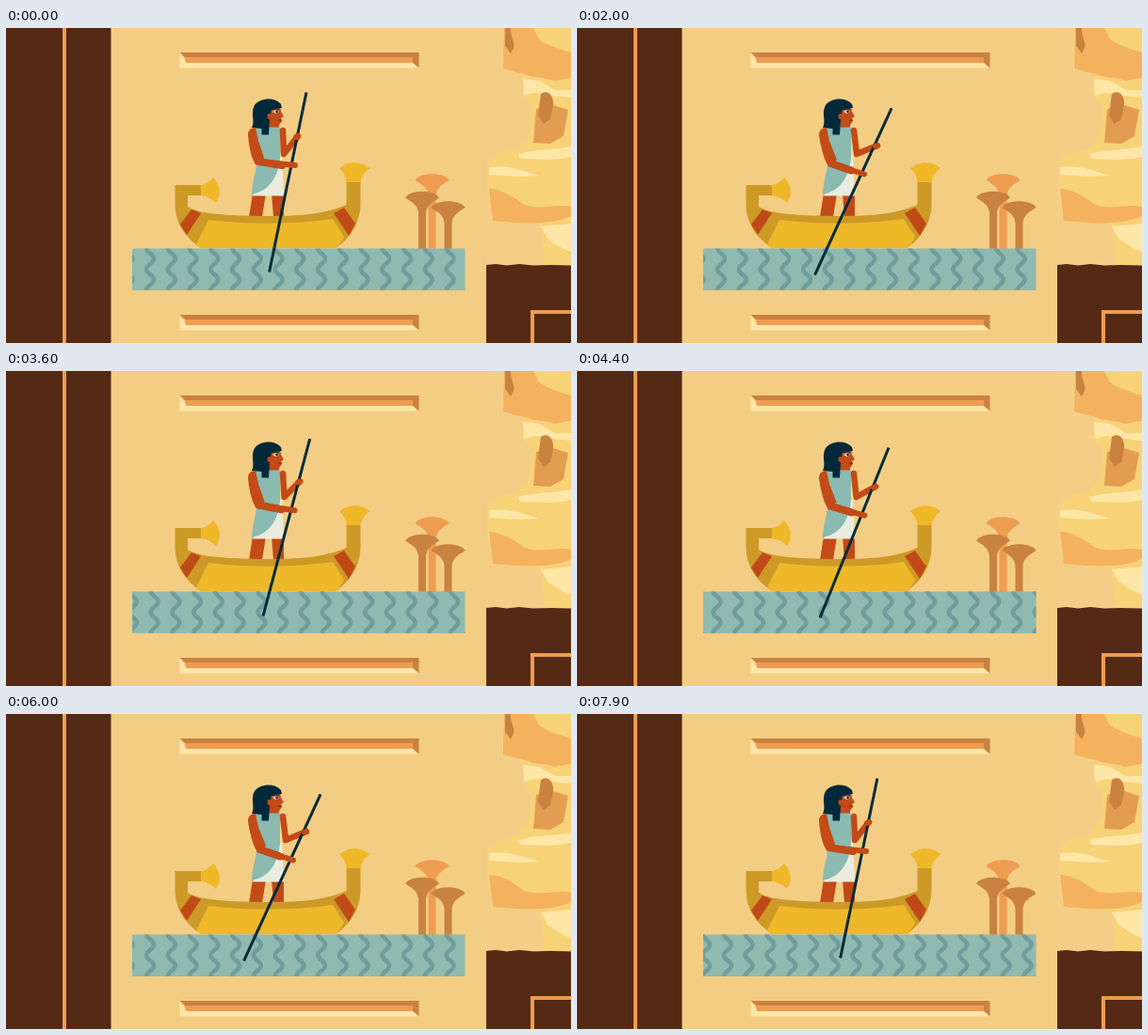
An HTML page that plays this animation: 600x335 px, repeating every 8000 ms.

```html
<!DOCTYPE html>
<html lang="en">
<head>
<meta charset="utf-8">
<title>River boat</title>
<style>
  html, body { margin: 0; width: 100%; height: 100%; overflow: hidden; background: #f4cd84; }
  svg { display: block; width: 600px; height: 335px; }
  .brown { fill: #542a15; }
  .orange { fill: #ee9c50; }
  .tan { fill: #c98240; }
  .cream { fill: #fde6a6; }
  .sand { fill: #f8d277; }
  .clay { fill: #f4b25f; }
  .gold { fill: #efb829; }
  .dark { fill: #cd9a28; }
  .red { fill: #c04a17; }
  .skin { fill: #c24b18; }
  .teal { fill: #8abab0; }
  .navy { fill: #02293a; }
  .limb { fill: none; stroke: #c24b18; stroke-linecap: round; stroke-linejoin: round; }
  #waves path { fill: none; stroke: #709d9b; stroke-width: 4.5; }
</style>
</head>
<body>
<svg viewBox="0 0 600 335">
  <defs>
    <g id="bar">
      <path class="cream" d="M184.500 26V42.500H438.500L431 36H191Z"/>
      <path class="tan" d="M184.500 26H438.500V42.500L432 37V31H190Z"/>
      <path class="orange" d="M190 31H432V37H191Z"/>
    </g>
    <path id="lotus" d="M-18 6C-14 -3 14 -3 18 6C12 10 5 13 4 22V90H-4V22C-5 13 -12 10 -18 6Z"/>
    <clipPath id="pool"><path d="M134 234.500H487.500V279H134Z"/></clipPath>
    <clipPath id="ground"><path d="M420 140H500V235H420Z"/></clipPath>
  </defs>

  <rect width="600" height="335" fill="#f4cd84"/>
  <path class="brown" d="M0 0H111.500V335H0Z"/>
  <path class="orange" d="M60 0H64V335H60Z"/>
  <use href="#bar"/>
  <use href="#bar" y="279"/>

  <!-- broken wall -->
  <rect x="510" width="90" height="252" fill="#f4ce86"/>
  <path class="clay" d="M529 0H600V53L582 56C572 52 562 54 551 49L542 47L528 43Z"/>
  <path class="sand" d="M560 0H600V26C586 22 575 18 566 12Z"/>
  <path class="tan" d="M530 0H536C535 9 541 14 539 21L536 27L530 19Z"/>
  <path class="sand" d="M550 50C563 54 576 58 587 56L600 53V127L575 131L543 130L556 112L558 84L549 72Z"/>
  <path class="cream" d="M549 54L566 56L583 66L600 66V74L580 72L562 69L550 72Z"/>
  <path fill="#e39d52" d="M563 86L581 82L597 87L592 115L578 123L560 122Z"/>
  <path class="tan" d="M568 70C575 65 582 71 581 83L578 97L571 102L565 93Z"/>
  <path class="sand" d="M512 145C517 133 533 128 550 130L600 127V207L568 209L518 206Q509 177 512 145Z"/>
  <path class="cream" d="M544 134C560 129 580 130 600 126V137C580 142 564 139 546 139Z"/>
  <path class="cream" d="M513 148C530 145 548 151 566 157L545 158L513 156Z"/>
  <path class="clay" d="M513 171C524 171 538 178 549 187C565 195 584 186 600 190V200C580 210 548 208 517 205Z"/>
  <path class="sand" d="M568 208H600V252H572Z"/>
  <path class="cream" d="M568 211L600 208V238C589 235 583 229 575 224Z"/>
  <path class="brown" d="M510 252L520 251L532 252.500L545 251L560 252.500L578 252L600 252.500V335H510Z"/>
  <path fill="none" stroke="#ee9c50" stroke-width="4" d="M559 335V302H600"/>

  <!-- papyrus -->
  <g clip-path="url(#ground)">
    <use href="#lotus" class="orange" x="452.500" y="156"/>
    <use href="#lotus" class="tan" x="442" y="174.500"/>
    <use href="#lotus" class="tan" x="469.500" y="185"/>
  </g>

  <!-- water -->
  <path fill="#90baaf" d="M134 234.500H487.500V279H134Z"/>
  <g clip-path="url(#pool)"><g id="waves"></g></g>

  <!-- boatman -->
  <path class="skin" d="M262 176H276L272 201H258Z"/>
  <path class="red" d="M282 176H295V201H284Z"/>
  <path class="skin" d="M279 96H290V109H276Z"/>
  <path fill="#f6dc8c" d="M286 106H295L294 139H286Z"/>
  <path fill="#e9ecdf" d="M270 137H293L295 178.500H262Z"/>
  <path class="teal" d="M264 105.500H291L291 138C289 157 281 173 261 177C261 164 267 150 266 139Z"/>
  <path class="skin" d="M278 83H291L292 89L295 94L292 96L293 99L290 103L279 101Z"/>
  <path class="navy" d="M261 106C265 98 259 91 264 82C270 74 285 73 292 81L293 85L282 86L280 97L279 113.500H271.500V107Z"/>
  <ellipse class="skin" cx="279.500" cy="94" rx="2" ry="3"/>
  <path fill="#fff" d="M283 89L287 87L290 89L287 91Z"/>
  <circle class="navy" cx="287.500" cy="89" r="1.400"/>
  <path stroke="#02293a" d="M282 86.500L290 86"/>
  <path stroke="#7d2010" d="M289 98H293"/>

  <!-- boat -->
  <path class="dark" d="M179.500 167H208V178H193V190C207 198 230 199 270 200C310 200 335 199 361.500 188V163H376.500V188C376 209 364 225 350 234H207C192 224 180 209 179.500 188Z"/>
  <path class="gold" d="M215 204C255 209 307 209 347 203L359 222Q355 230 350 234H207L202 230Z"/>
  <path class="red" d="M185 209L197 193L207 197L192 220Z"/>
  <path class="red" d="M348 197L359 191L371 208L364 221Z"/>
  <path class="gold" d="M207 167Q214 166 220 159Q232 172 223 186Q216 179 207 178Z"/>
  <path class="gold" d="M361.500 164Q361 156 354 149Q370 137 386.500 149Q377 156 376.500 164Z"/>

  <!-- arms and pole -->
  <path id="farArm" class="limb" stroke-width="6.500"/>
  <path id="pole" fill="none" stroke="#082b39" stroke-width="3"/>
  <path id="nearArm" class="limb" stroke-width="8"/>
  <path id="upperArm" class="skin"/>
  <path id="hands" class="limb" stroke-width="6"/>
</svg>
<script>
const LOOP = 8000, STROKE = LOOP / 6;
const GAP = 22.75, FLOW = STROKE / 4;
const PULLED = 0.51, UPRIGHT = 0.95;
const $ = id => document.getElementById(id);
const mix = (a, b, k) => a + (b - a) * k;
const at = (x0, y0, x1, y1, k) => [mix(x0, x1, k), mix(y0, y1, k)];

const CREST = 11.2;
for (let i = -1; i < 17; i++) {
  const x = 128 + i * GAP;
  let d = `M${x - 4} 234`;
  for (let j = 1; j < 5; j++) {
    const side = j % 2 ? 4 : -4, y = 234 + j * CREST;
    d += `C${x - side} ${y - 6} ${x + side} ${y - 5} ${x + side} ${y}`;
  }
  const p = document.createElementNS('http://www.w3.org/2000/svg', 'path');
  p.setAttribute('d', d);
  $('waves').append(p);
}

const easeInOut = k => k < 0.5 ? 4 * k ** 3 : 1 - 4 * (1 - k) ** 3;

// 0 = pole upright, 1 = pole pushed back
function push(t) {
  const ph = (t / STROKE) % 1;
  if (ph >= PULLED && ph < UPRIGHT)
    return ((UPRIGHT - ph) / (UPRIGHT - PULLED)) ** 2.5;
  return easeInOut(((ph + 1 - UPRIGHT) % 1) / (1 - UPRIGHT + PULLED));
}

function draw(now) {
  const t = now % LOOP, k = push(t);
  $('waves').setAttribute('transform', `translate(${(2.4 / GAP + 1 - t / FLOW % 1) * GAP})`);

  const angle = mix(11.6, 24.7, k) * Math.PI / 180;
  const [cx, cy] = at(299.3, 164, 293.3, 174, k);
  const dx = Math.sin(angle) * 97.5, dy = Math.cos(angle) * 97.5;
  $('pole').setAttribute('d', `M${cx + dx} ${cy - dy}L${cx - dx} ${cy + dy}`);

  const far = at(310, 115, 319, 125, k), farElbow = at(295, 134, 297, 134, k);
  const near = at(307, 146, 305, 155.5, k), elbow = at(268, 142, 270, 144, k);
  $('farArm').setAttribute('d', `M294 109L${farElbow}L${far}`);
  $('nearArm').setAttribute('d', `M${elbow}L${near[0] - 14} ${near[1] - mix(0, 4, k)}`);
  const [ex, ey] = elbow;
  $('upperArm').setAttribute('d',
    `M257 114Q257 106 265 106L268 120L${ex + 6} ${ey - 4}L${ex - 2} ${ey + 4}Q${ex - 9} ${ey - 4} 257 114Z`);
  $('hands').setAttribute('d',
    `M${elbow}L${near}M${far[0] - 2} ${far[1] + 1}L${far}`);
  requestAnimationFrame(draw);
}
requestAnimationFrame(draw);
</script>
</body>
</html>
```
